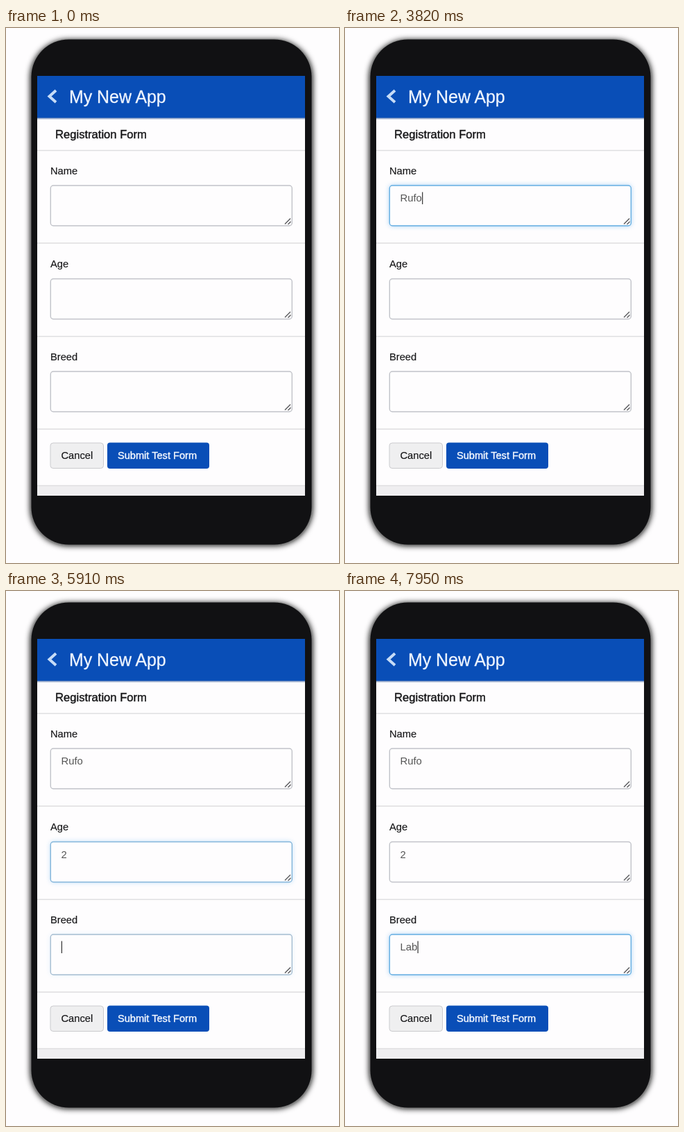
Write an HTML page that moves like this. It is 480x771 px and loops after 8000 ms.

```html
<!DOCTYPE html>
<html lang="en">
<head>
<meta charset="utf-8">
<title>Registration Form</title>
<style>
  html, body { margin: 0; width: 100%; height: 100%; overflow: hidden; background: #fefdfe; }
  svg { display: block; width: 100%; height: 100%; }
  text { font-family: "Liberation Sans", Arial, sans-serif; font-size: 14.7px; fill: #151517; stroke: #151517; stroke-width: .15; white-space: pre; }
  .title { font-size: 24.9px; fill: #f0f6ff; stroke: #f0f6ff; stroke-width: .3; }
  .head { font-size: 16.6px; stroke-width: .4; }
  .submit { font-size: 14.6px; fill: #f4f8ff; stroke: #f4f8ff; stroke-width: .4; }
  .value { font-size: 14.8px; fill: #555; stroke: none; }
  .rule { stroke: #dedee0; stroke-width: 1.5; }
  .grip { fill: none; stroke: #505054; stroke-width: 1.2; }
</style>
</head>
<body>
<svg viewBox="0 0 480 771" preserveAspectRatio="none">
  <defs>
    <filter id="shade" x="-10%" y="-10%" width="120%" height="120%"><feGaussianBlur stdDeviation="4"/></filter>
    <filter id="glow" x="-10%" y="-40%" width="120%" height="180%"><feGaussianBlur stdDeviation="3.5"/></filter>
    <linearGradient id="drop" x2="0" y2="1">
      <stop stop-color="#7e95bb"/><stop offset="1" stop-color="#fefdfe"/>
    </linearGradient>
  </defs>
  <rect width="480" height="771" fill="#fefdfe"/>
  <rect x="35" y="17" width="407" height="729" rx="55" fill="#111" filter="url(#shade)"/>
  <rect x="36.5" y="16.5" width="404" height="728" rx="54" fill="#111113"/>
  <rect x="45" y="69" width="386" height="605" fill="#fefdfe"/>
  <rect x="45" y="69" width="386" height="61" fill="#094eb7"/>
  <rect x="45" y="129.5" width="386" height="3" fill="url(#drop)"/>
  <path d="M72 90L62.5 98.5L72 107" fill="none" stroke="#c6dcf7" stroke-width="4"/>
  <text class="title" x="91" y="108">My New App</text>
  <text class="head" x="71" y="159">Registration Form</text>
  <path class="rule" d="M45 176.5H431M45 310H431M45 444.5H431M45 578H431"/>
  <g id="fields"></g>
  <rect x="64" y="598" width="76.5" height="36.5" rx="4" fill="#efeff0" stroke="#cbcbce"/>
  <text x="79.5" y="620.5">Cancel</text>
  <rect x="146" y="597.5" width="147" height="37.5" rx="4" fill="#094eb7"/>
  <text class="submit" x="161" y="620.5">Submit Test Form</text>
  <rect x="45" y="659" width="386" height="15" fill="#efeef0"/>
  <path class="rule" d="M45 659.5H431"/>
  <path id="caret" d="M0 0V17.5" stroke="#333" stroke-width="1.2"/>
</svg>
<script>
  const LOOP = 8000, FADE = 200, BLINK = 500;
  const GREY = [193, 195, 201], BLUE = [102, 175, 226];

  // focus and blur times, the typed value and the time of each key
  const fields = [
    { label: 'Name', y: 227, on: 1310, off: 4480, value: 'Rufo', keys: [2820, 3000, 3270, 3360] },
    { label: 'Age', y: 361.5, on: 4480, off: 5850, value: '2', keys: [5450] },
    { label: 'Breed', y: 495, on: 5850, off: Infinity, value: 'Lab', keys: [7270, 7500, 7680] }
  ];

  const root = document.getElementById('fields');
  const caret = document.getElementById('caret');

  function add(tag, attrs, content = '') {
    const el = document.createElementNS('http://www.w3.org/2000/svg', tag);
    for (const name in attrs) el.setAttribute(name, attrs[name]);
    el.textContent = content;
    return root.appendChild(el);
  }

  for (const f of fields) {
    const box = { x: 64.3, y: f.y, width: 348, height: 58, rx: 4 };
    add('text', { x: 64, y: f.y - 16.5 }, f.label);
    f.glow = add('rect', { ...box, fill: '#52a8ec', filter: 'url(#glow)' });
    f.box = add('rect', { ...box, fill: '#fefdfe', 'stroke-width': 1.4 });
    f.text = add('text', { class: 'value', x: 79.5, y: f.y + 23 });
    add('path', { class: 'grip', d: `M402 ${f.y + 55.5}l8-8M406.5 ${f.y + 56}l4-4` });
  }

  const clamp = v => Math.max(0, Math.min(1, v));
  const mix = p => `rgb(${GREY.map((c, i) => c + (BLUE[i] - c) * p)})`;

  function render(t) {
    caret.setAttribute('opacity', 0);
    for (const f of fields) {
      const p = clamp((t - f.on) / FADE) - clamp((t - f.off) / FADE);
      f.glow.setAttribute('opacity', .6 * p);
      f.box.setAttribute('stroke', mix(p));

      const pressed = f.keys.filter(k => k <= t);
      f.text.textContent = f.value.slice(0, pressed.length);

      if (t >= f.on && t < f.off) {
        const since = t - (pressed.at(-1) ?? f.on);
        const x = 80.4 + f.text.getComputedTextLength();
        caret.setAttribute('transform', `translate(${x} ${f.y + 9.5})`);
        caret.setAttribute('opacity', since % (2 * BLINK) < BLINK ? 1 : 0);
      }
    }
  }

  const start = performance.now();
  function tick() {
    render((performance.now() - start) % LOOP);
    requestAnimationFrame(tick);
  }
  tick();
</script>
</body>
</html>
```
